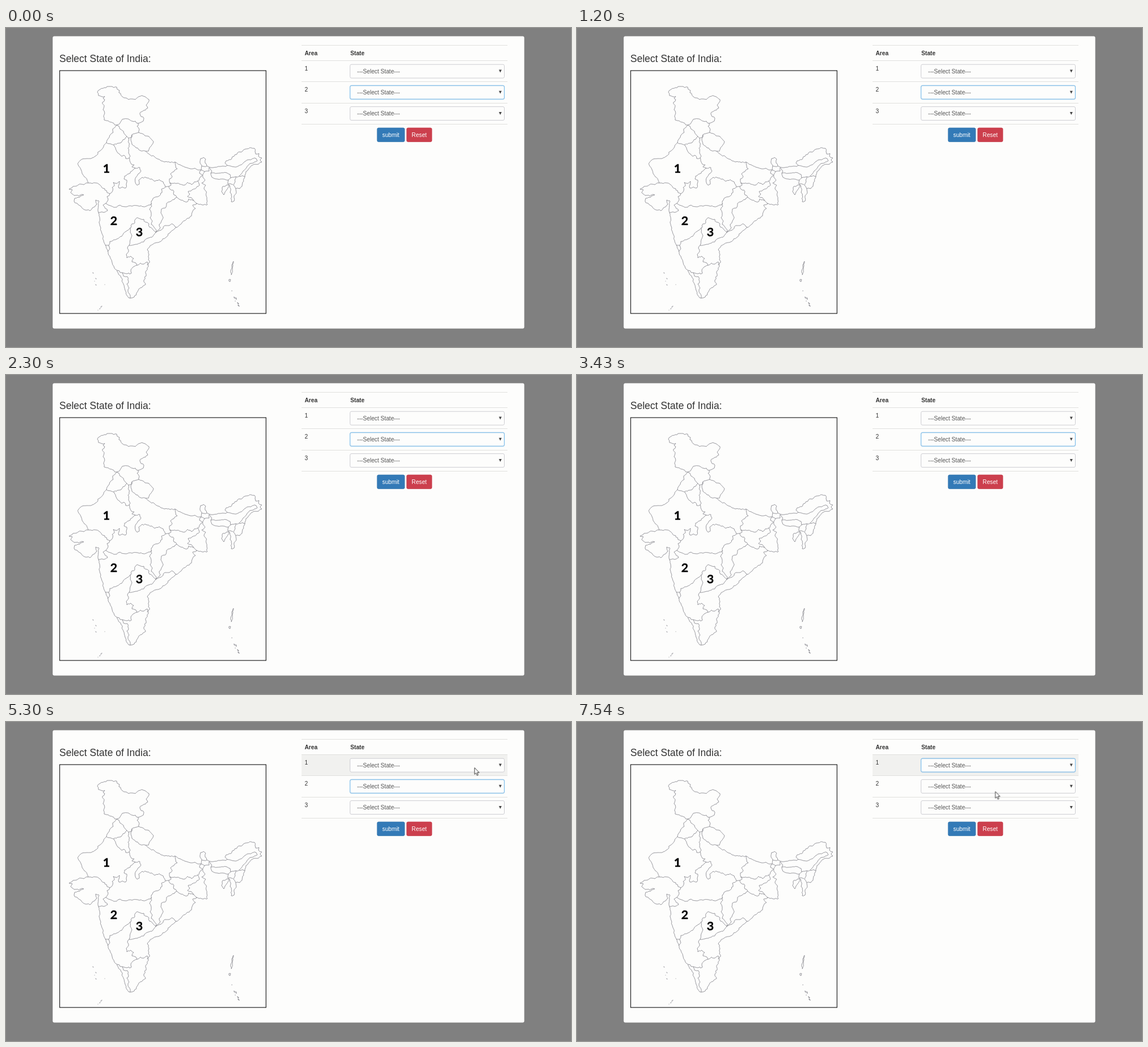
These frames come from a looping animation (996 by 562 pixels, 8000 ms). An HTML page:

```html
<!DOCTYPE html>
<html lang="en">
<head>
<meta charset="utf-8">
<title>Select State of India</title>
<style>
html, body { margin: 0; width: 100%; height: 100%; overflow: hidden; background: #808080; }
svg { display: block; width: 996px; height: 562px; }
text { font: 10.2px "Liberation Sans", Arial, sans-serif; fill: #333; }
.title { font-size: 17.5px; }
.head { font-weight: bold; }
.area { font: 700 21.5px Lato, "Open Sans", sans-serif; fill: #000; stroke: #000; stroke-width: .35; text-anchor: middle; }
.label { fill: #555; }
.btn { fill: #fff; text-anchor: middle; }
.rule { stroke: #e0e0de; }
#map path { fill: none; stroke: #77777f; stroke-width: .75; stroke-linejoin: round; }
#map .isle { stroke-width: 1.2; stroke-linecap: round; }
.box { fill: #fdfdfc; stroke: #cdcdd2; }
.ring { fill: none; stroke: #82c0ec; }
.glow { fill: none; stroke: #66afe9; stroke-width: 2.6; opacity: .14; }
#hover { fill: #f1f1ef; animation: hover 8s step-end infinite; }
#focus1 { animation: gain 8s linear infinite; }
#focus2 { animation: lose 8s linear infinite; }
#cursor { animation: hover 8s step-end infinite, move 8s linear infinite; }
@keyframes hover { 0% { opacity: 0; } 56.25%, 100% { opacity: 1; } }
@keyframes gain { 0%, 76.75% { opacity: 0; } 78.3%, 100% { opacity: 1; } }
@keyframes lose { 0%, 76.75% { opacity: 1; } 78.3%, 100% { opacity: 0; } }
@keyframes move {
  0%, 56.25% { transform: translate(832px, 83px); }
  57.5%, 66.3% { transform: translate(826px, 80.5px); }
  68%, 70.8% { transform: translate(823px, 80px); }
  73.375%, 84.6% { transform: translate(848.5px, 80px); }
  87.5% { transform: translate(818px, 96px); }
  90.5% { transform: translate(762px, 121px); }
  92.5% { transform: translate(736.5px, 127.5px); }
  94.25%, 100% { transform: translate(737.5px, 122.5px); }
}
</style>
</head>
<body>
<svg viewBox="0 0 996 562">
  <defs>
    <g id="select">
      <rect class="box" x="606.5" y="-12" width="272" height="24" rx="2.5"/>
      <text class="label" x="619" y="3.6">---Select State---</text>
      <path d="M868.8-2.6h5l-2.5 5z" fill="#444"/>
    </g>
    <g id="focus">
      <rect class="glow" x="606.5" y="-12" width="272" height="24" rx="3"/>
      <rect class="ring" x="606.5" y="-12" width="272" height="24" rx="2.5"/>
    </g>
  </defs>
  <rect x="82.3" y="14.6" width="831.3" height="515" rx="3" fill="#fdfdfc"/>
  <text class="title" x="94" y="60">Select State of India:</text>
  <rect x="94.6" y="75.1" width="363.8" height="427.8" fill="#fdfdfc" stroke="#222" stroke-width="1.2"/>

  <g id="map">
    <!-- north -->
    <path d="M195 171L188 167 181 164 173 162 172 156 174 150 171 144 173 138 170 131 174 126 171 124 174 120 169 121 163 119 161 113 166 108 173 105 182 103 187 103 190 105 195 104 196 108 200 110 199 114 205 121 210 123 216 126 222 125 228 126 234 121 239 119 245 121 252 126 250 132 247 136 250 141 243 145 236 150 238 156 243 159 242 164 236 167 233 168"/>
    <path d="M233 168L228 164 222 164 217 161 209 160 203 164 200 169 195 171"/>
    <path d="M195 171L192 175 188 178 189 184 183 189 180 195 177 202"/>
    <path d="M195 171L199 173 201 178 207 182 210 188 213 191"/>
    <path d="M177 202L184 204 190 206 197 203 203 202 206 197 211 193 213 191"/>
    <path d="M233 168L231 173 235 179 234 184 227 186 222 188 221 192 216 194 213 191"/>
    <path d="M234 184L240 186 245 190 252 191 257 197 260 200 257 206 253 211 251 217 246 217"/>
    <path d="M222 188L220 197 222 205 229 211 237 216 246 217"/>
    <path d="M216 194L217 206 215 212 216 220 219 226 218 232 221 240"/>
    <path d="M190 206L193 211 195 217 200 222 204 226 208 224 211 230 217 229"/>
    <path d="M246 217L252 222 262 227 268 231 279 236 290 237 298 236 307 241 315 245 325 248 333 247 340 250 344 250"/>

    <!-- north-east -->
    <path d="M344 250L345 243 342 238 343 230 348 228 352 231 351 238 354 243 349 244 345 243"/>
    <path d="M354 243L358 245 365 246 376 244 387 244 390 242"/>
    <path d="M390 242L386 238 388 234 396 232 402 226 408 220 417 217 424 213 432 211 438 212 439 217 440 222 446 221 445 226 451 229 448 232 451 236 445 240 438 240 432 243 427 249 423 253 421 260"/>
    <path d="M390 242L398 244 408 244 415 241 420 236 428 232 436 230 441 230 443 234 436 238 428 241 424 246 418 252 414 258 411 261 405 262"/>
    <path d="M411 261L416 260 421 262"/>
    <path d="M405 262L404 270 401 277 405 283 412 283 416 279 419 270 421 260"/>
    <path d="M393 276L396 283 395 290 398 298 397 306 402 305 402 296 406 289 405 283"/>
    <path d="M381 281L380 288 384 294 386 289 391 282 393 276 388 277 381 281"/>
    <path d="M361 256L363 263 372 266 382 266 392 268 396 264 395 258 389 255 380 255 372 256 361 256 363 252 358 246"/>
    <path d="M392 268L391 275 400 276"/>
    <path d="M396 264L405 262"/>

    <!-- east -->
    <path d="M298 236L299 243 302 248 296 253 290 257 293 262 288 266 288 271 291 277"/>
    <path d="M288 273L299 274 306 275 313 277 320 272 327 276 332 271 338 269"/>
    <path d="M344 250L341 256 346 259 341 265 338 270 341 277 335 282 328 285 321 288 324 293 320 297 327 299 331 304 336 309"/>
    <path d="M344 250L350 253 358 252 358 246"/>
    <path d="M350 253L347 258 347 263 351 268 345 273 352 277 349 283 353 288 353 296 354 302 355 311 347 312 340 311 335 309"/>
    <path d="M291 277L287 279 289 284 296 288 296 294 301 298 306 302 313 305 320 306 322 301 331 304"/>
    <path d="M287 279L281 280 274 284 275 290 270 296 261 299 256 305 257 314 253 320 256 328 254 334 258 340 256 346 261 351 265 356 264 360"/>
    <path d="M301 298L297 302 289 306 283 309 281 317 274 319 273 326 277 333 274 340 270 346 272 351 264 360"/>
    <path d="M264 360L270 357 277 353 280 348 288 348 293 345 300 351"/>
    <path d="M336 309L329 312 334 318 329 323 327 331 318 337 309 345 297 354 289 361 283 368 275 374 268 378 259 381 253 386 249 391 252 399 251 408 253 413 249 418"/>

    <!-- west and centre -->
    <path d="M177 202L172 209 165 217 157 226 150 230 143 230 134 231 127 238 128 243 132 249 134 256 138 262 143 268 145 273"/>
    <path d="M145 273L137 276 128 276 118 279 111 284 117 285 114 290 120 295 128 296 134 293 137 294 130 298 121 300 120 305 127 311 134 317 141 321 148 322 154 316 160 311 158 303 163 304 163 312 162 320 163 325"/>
    <path d="M145 273L152 274 159 273 165 276 170 282 174 283 178 290 183 292"/>
    <path d="M183 292L188 287 187 281 191 278 189 272 195 274 200 270 199 277 199 282 205 280 211 282 212 275 213 268 208 266 209 261 216 257 222 252 228 247 236 246"/>
    <path d="M221 240L226 241 222 245 228 247"/>
    <path d="M236 246L238 252 233 257 229 263 228 272 231 277 235 275 234 268 240 263 248 264 257 266 262 270 270 267 277 271 281 280"/>
    <path d="M183 292L178 297 180 303 176 309 184 313 192 316 201 312 211 315 222 314 232 313 243 315 251 312 257 309"/>
    <path d="M176 309L171 312 175 318 179 322 172 325 163 325"/>

    <!-- south -->
    <path d="M163 325L165 333 164 342 167 352 169 362 172 374 175 382 179 391 183 402 187 413 191 423 196 429 203 440 207 451 210 462 213 471 219 476 226 474 230 467 234 460 241 455 246 452 243 444 247 437 247 428 251 420 249 412"/>
    <path d="M175 383L181 383 183 389 179 394"/>
    <path d="M181 383L183 376 190 373 197 371 204 367 207 362 213 357 219 352"/>
    <path d="M217 383L219 373 222 366 219 360 219 352 222 345 227 343 228 337 231 334 236 336 243 337 246 342 252 345 253 351 258 354 264 360"/>
    <path d="M264 360L259 367 251 370 244 374 237 379 229 381 221 383 217 383"/>
    <path d="M217 383L214 388 216 394 212 399 213 405 220 402 225 406 222 412 229 414 231 418 237 414 243 416 249 412"/>
    <path d="M231 418L224 421 220 428 221 432 213 433 205 431 196 427"/>
    <path d="M205 431L207 437 214 438 216 446 213 451 217 458 215 464 219 472 219 476"/>

    <!-- islands -->
    <path d="M401 411L398 418 398 424 396 430 397 435 399 427 400 419 401 411"/>
    <path d="M393 443L396 443 395 447 393 446 393 443"/>
    <path class="isle" d="M398 463h.4M402 474l1 2M405 475l1 3M404 481h.3M408 484l2 2M409 488l2 2"/>
    <path class="isle" opacity=".65" d="M153 431l1 1M158 441l1 1M156 446h.3M158 452l1 1M174 452h.3M169 490l-2 2M166 494l-1 1M162 497h.3"/>
  </g>
  <text class="area" x="177" y="254.5">1</text>
  <text class="area" x="190" y="347.3">2</text>
  <text class="area" x="235" y="366.5">3</text>

  <rect id="hover" x="521" y="58" width="363" height="36.5"/>
  <path class="rule" d="M521 30.5h363M521 57.5h363M521 94.5h363M521 132.5h363M521 169.5h363"/>
  <text class="head" x="526.5" y="47.5">Area</text>
  <text class="head" x="607" y="47.5">State</text>
  <text x="526.5" y="75">1</text>
  <text x="526.5" y="112">2</text>
  <text x="526.5" y="149.5">3</text>
  <use href="#select" y="76.2"/>
  <use href="#select" y="113.4"/>
  <use href="#select" y="150.6"/>
  <g id="focus1"><use href="#focus" y="76.2"/></g>
  <g id="focus2"><use href="#focus" y="113.4"/></g>

  <rect x="654.3" y="176" width="48.4" height="24.4" rx="2.5" fill="#337ab7" stroke="#3576ae" stroke-width=".8"/>
  <text class="btn" x="678.3" y="191.8">submit</text>
  <rect x="706.3" y="176" width="44.4" height="24.4" rx="2.5" fill="#cc3f4d" stroke="#c63c4a" stroke-width=".8"/>
  <text class="btn" x="728.4" y="191.8">Reset</text>

  <g id="cursor">
    <path d="M0 0V11.7L2.6 9.3 4.4 13.6 6.3 12.8 4.5 8.6H8.2Z" fill="#fff" stroke="#222" stroke-width=".9"/>
  </g>
</svg>
<script>
// Break long border segments with a seeded wobble for ragged borders.
let seed = 7;
const wobble = size => {
  seed = (seed * 16807) % 2147483647;
  return (seed / 2147483647 - .5) * size;
};
const between = (a, b, k) => a.map((v, i) => v + (b[i] - v) * k + wobble(2.4));

for (const path of document.querySelectorAll('#map path:not(.isle)')) {
  const nums = path.getAttribute('d').match(/\d+/g).map(Number);
  const out = [];
  for (let i = 0; i < nums.length; i += 2) {
    const p = [nums[i], nums[i + 1]];
    const last = out[out.length - 1];
    const parts = last ? Math.round(Math.hypot(p[0] - last[0], p[1] - last[1]) / 3) : 0;
    for (let n = 1; n < parts; n++) out.push(between(last, p, n / parts));
    out.push(p);
  }
  path.setAttribute('d', 'M' + out.map(p => p.map(v => v.toFixed(1)).join(' ')).join('L'));
}
</script>
</body>
</html>
```
